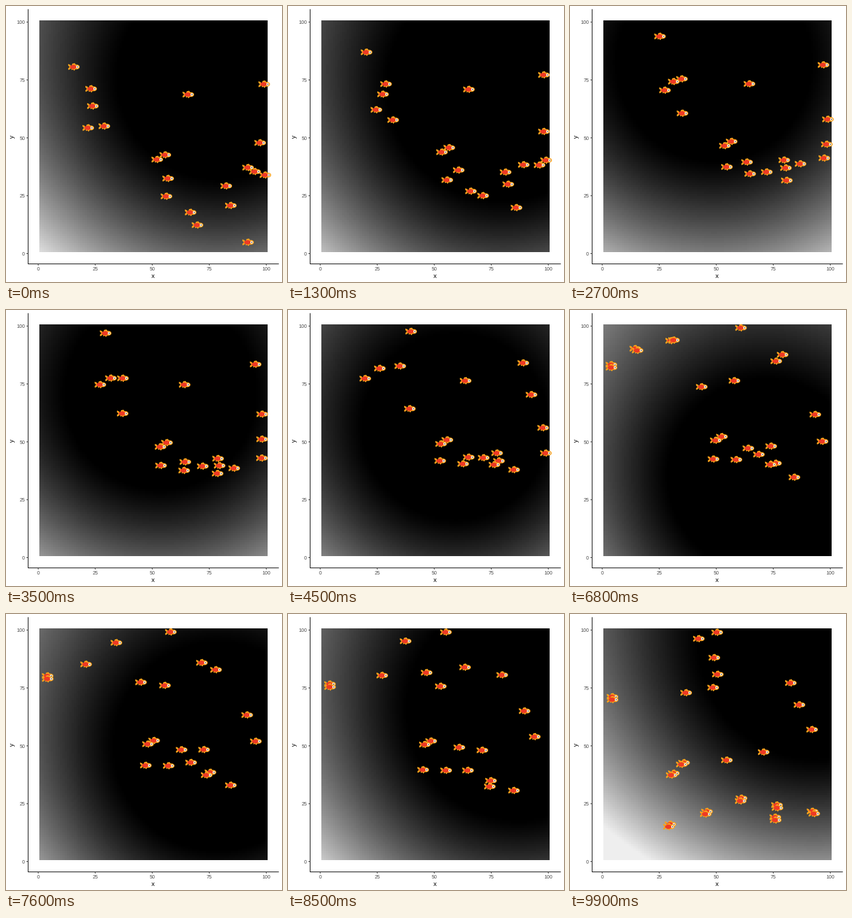
A matplotlib script that plays this animation: 480x480 px, repeating every 10 s.

```python
import numpy as np
import matplotlib.pyplot as plt
from matplotlib.animation import FuncAnimation
from matplotlib.collections import PolyCollection

FRAMES = 100
X0, X1, Y0, Y1 = 57.6, 454.6, 25.5, 428.4

plt.rcParams["font.family"] = "Liberation Sans"
fig = plt.figure(figsize=(4.8, 4.8), dpi=100, facecolor="white")
ax = fig.add_axes([0, 0, 1, 1])
ax.axis("off")


def px(n):
    """Pixels to points."""
    return n * 72 / fig.dpi


# --- axes ---
def line(xs, ys, color="black"):
    ax.plot(xs, ys, color=color, lw=px(1.07), solid_capstyle="butt", snap=False)


def label(x, y, s, size=8.8, color="#4d4d4d", **kw):
    kw = {"ha": "center", "va": "center_baseline", **kw}
    ax.text(x, y, s, fontsize=px(size), color=color, **kw)


line([38.5, 38.5], [5.5, 449])
line([38, 474.5], [448.5, 448.5])
for v in range(0, 101, 25):
    x, y = 56 + 3.966 * v, 430.5 - 4.025 * v
    line([x, x], [448.5, 451.5], "#333333")
    line([35.5, 38.5], [y, y], "#333333")
    label(x, 457, str(v))
    label(33, y, str(v), ha="right")
label(256, 469, "x", 11, "black")
label(10.5, 227, "y", 11, "black", rotation=90, va="center")


# --- light: a dark disc wanders, brightness grows with distance from its rim ---
DISC_TIMES = [0, 13, 27, 45, 68, 85, 99]
DISC = np.array([  # centre x, centre y, radius
    (370, 125, 175), (372, 140, 198), (250, 100, 168), (291, 203, 160),
    (340, 290, 168), (400, 165, 192), (425, 50, 200),
])
CELL = (np.arange(100) + 0.5) / 100
GX, GY = np.meshgrid(X0 + CELL * (X1 - X0), Y0 + CELL * (Y1 - Y0))
DEPTH_GAIN = 0.85 + 0.4 * CELL[:, None]


def track(times, points, i):
    """Straight legs between timed points."""
    return np.array([np.interp(i, times, axis) for axis in np.transpose(points)])


def light(i):
    cx, cy, r = track(DISC_TIMES, DISC, i)
    beyond = np.maximum(np.hypot(GX - cx, GY - cy) - r, 0)
    return np.minimum(0.00088 * beyond ** 1.2 * DEPTH_GAIN, 0.93)


field = ax.imshow(light(0), cmap="gray", vmin=0, vmax=1, aspect="auto",
                  interpolation="nearest", extent=(X0, X1, Y1, Y0), zorder=0)
ax.set(xlim=(0, 480), ylim=(480, 0))


# --- swimming ---
BURST_START = 85
BURST_CENTRE = np.array([340, 235])
BURST = np.array([[0.6, 0], [-0.6, 1]])


def rover(*points):
    """Swims straight legs of equal duration."""
    times = np.linspace(0, FRAMES - 1, len(points))
    return lambda i: track(times, points, i)


def drifter(*points):
    """Follows a parabola through three points, then bursts outwards."""
    a, b, c = np.array(points)

    def at(i):
        s = min(i / BURST_START, 1)
        p = a * (1 - s) * (1 - 2 * s) + b * 4 * s * (1 - s) + c * s * (2 * s - 1)
        t = max(i - BURST_START, 0) / (FRAMES - 1 - BURST_START)
        return p + t * BURST @ (p - BURST_CENTRE)
    return at


school = [
    rover((118, 106), (165, 41), (300, 31), (256, 32)),
    rover((148, 144), (205, 123), (178, 53), (224, 43)),
    rover((151, 174), (187, 122), (112, 66), (202, 137)),
    rover((143, 212), (170, 132), (72, 97), (74, 149)),
    rover((171, 209), (216, 168), (251, 76)),
    rover((317, 154), (308, 120), (249, 128)),
    rover((449, 136), (439, 95), (357, 87), (384, 120)),
    rover((442, 238), (450, 188), (377, 76), (257, 105)),
    rover((433, 288), (450, 245), (421, 201)),
    rover((451, 294), (443, 196), (399, 158)),
    drifter((277, 259), (278, 227), (249, 221)),
    drifter((263, 267), (267, 234), (238, 227)),
    drifter((282, 300), (314, 258), (298, 232)),
    drifter((279, 331), (266, 264), (235, 271)),
    drifter((321, 359), (306, 270), (275, 272)),
    drifter((333, 381), (341, 260), (313, 272)),
    drifter((383, 313), (365, 251), (338, 237)),
    drifter((391, 347), (368, 264), (353, 290)),
    drifter((421, 281), (394, 277), (393, 307)),
    drifter((421, 411), (361, 272), (351, 300)),
]


# --- fish ---
def oval(cx, cy, rx, ry, n=16):
    a = np.linspace(0, 2 * np.pi, n, endpoint=False)
    return np.column_stack([cx + rx * np.cos(a), cy + ry * np.sin(a)])


def shape(*points):
    return np.array(points, float)


ORANGE, RED = "#f9a11b", "#ee3a24"
PARTS = [
    (shape((-4, 0), (-6, -3.6), (-9.8, -5.2), (-10, -2.6), (-7.4, 0),
           (-10, 2.8), (-9.4, 5.4), (-6, 3.6)), ORANGE),
    (shape((-4, -2.5), (-2.5, -5.8), (1.5, -6.6), (5, -2)), ORANGE),
    (shape((-4.5, 2), (-4, 5.4), (-1.4, 4.4), (0.8, 6.6), (4, 2)), ORANGE),
    (oval(4.6, 0, 5.6, 4.2), ORANGE),
    (oval(-0.8, 0, 5.2, 3.8), RED),
    (shape((-4, -1.4), (-7, -1.8), (-6.2, 0), (-7, 1.8), (-4, 1.4)), RED),
    (oval(6.2, 0, 2.3, 2.3), "white"),
    (oval(6.4, 0, 1, 1, 10), "#5a4a30"),
]
fish = PolyCollection([], facecolors=[c for _, c in PARTS], edgecolors="none", zorder=3)
ax.add_collection(fish, autolim=False)

GLOW, TRAIL = 0.22, 5


def cell(value, low, high):
    return int(np.clip((value - low) / (high - low) * 100, 0, 99))


def draw(i):
    glow = light(i)
    field.set_data(glow)
    spots = []
    for swim in school:
        p = swim(i)
        step = p - swim(max(i - 1, 0))
        speed = np.hypot(*step)
        # an afterimage follows fish that move in bright water
        if speed and glow[cell(p[1], Y0, Y1), cell(p[0], X0, X1)] > GLOW:
            spots.append(p - step / speed * TRAIL)
        spots.append(p)
    fish.set_verts([part + spot for spot in spots for part, _ in PARTS])
    return field, fish


anim = FuncAnimation(fig, draw, frames=FRAMES, interval=100, repeat=True, repeat_delay=0)
plt.show()
```
